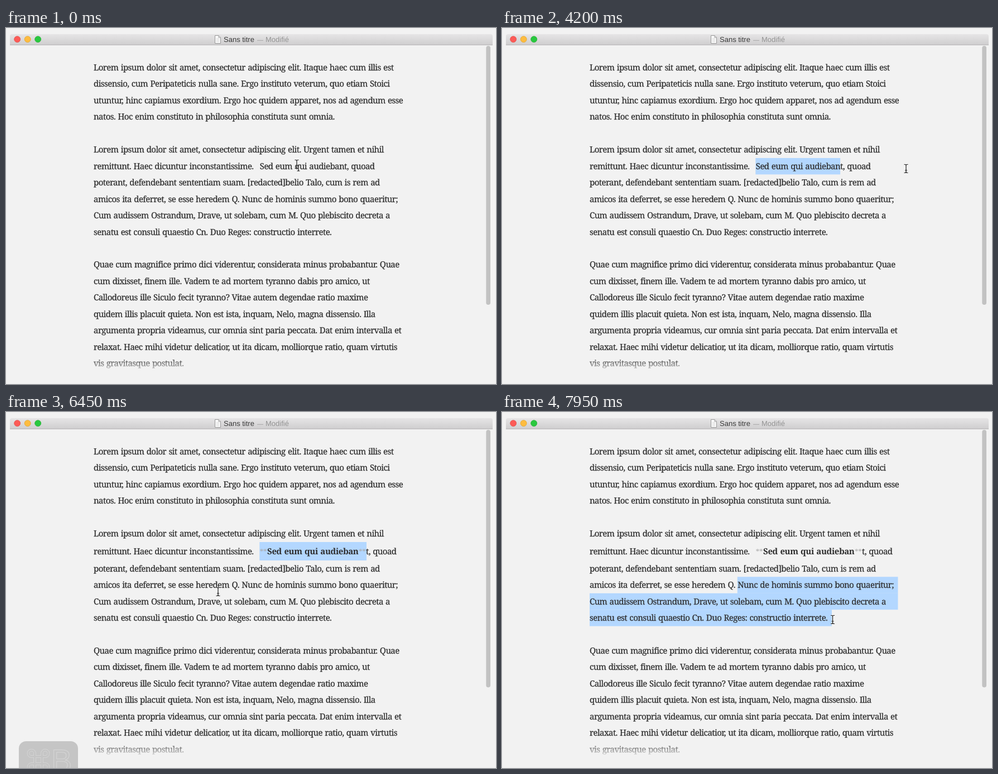
Recreate the animation shown at these times as an HTML page. Size 878 by 638 pixels, loop 8000 ms.

```html
<!DOCTYPE html>
<html lang="la">
<head>
<meta charset="utf-8">
<title>Sans titre</title>
<style>
  html, body { margin: 0; width: 100%; height: 100%; overflow: hidden; background: #f2f2f2; }
  svg { display: block; width: 878px; height: 638px; }
  text { white-space: pre; text-rendering: geometricPrecision; }
  .body {
    font: 15px "Noto Serif", serif; letter-spacing: -.57px; word-spacing: 1px;
    fill: #2e2e2e; stroke: #2e2e2e; stroke-width: .25px;
  }
  .bold { font-weight: 700; letter-spacing: -.4px; stroke: none; }
  .mark { font-size: 13px; fill: #a9a9a9; letter-spacing: -.25px; stroke: none; }
  .title { font: 13px "Liberation Sans", Arial, sans-serif; fill: #3b3b3b; }
  .dim { fill: #949494; }
  .dash { font-size: 11px; }
  .key { font: 56px "Liberation Sans", Arial, sans-serif; }
</style>
</head>
<body>
<svg viewBox="0 0 878 638">
  <defs>
    <linearGradient id="bar" x2="0" y2="1">
      <stop stop-color="#e6e5e6"/><stop offset="1" stop-color="#cfcecf"/>
    </linearGradient>
    <linearGradient id="fade" x2="0" y2="1">
      <stop stop-color="#f2f2f2" stop-opacity="0"/><stop offset="1" stop-color="#f2f2f2"/>
    </linearGradient>
    <path id="loop" d="M51.5 617.5V611.75A5.75 5.75 0 1 0 45.75 617.5H70.25A5.75 5.75 0 1 0 64.5 611.75V636.25A5.75 5.75 0 1 0 70.25 630.5H45.75A5.75 5.75 0 1 0 51.5 636.25Z"/>
    <path id="beam" d="M-3.5-7.5H-2Q0-7.5 0-5.5V5.5Q0 7.5-2 7.5H-3.5M3.5-7.5H2Q0-7.5 0-5.5M0 5.5Q0 7.5 2 7.5H3.5M-2 3H2"/>
  </defs>
  <rect width="878" height="638" fill="#f2f2f2"/>

  <path d="M7 30V15a4 4 0 0 1 4-4H868a4 4 0 0 1 4 4V30Z" fill="url(#bar)"/>
  <path d="M7 30.3H872" stroke="#b2b1b2"/>
  <g stroke-width=".7">
    <circle cx="20.2" cy="20.2" r="5.5" fill="#fc5b57" stroke="#e2443f"/>
    <circle cx="38.7" cy="20.2" r="5.5" fill="#fdbc40" stroke="#dfa023"/>
    <circle cx="57.2" cy="20.2" r="5.5" fill="#29c83f" stroke="#1dad2b"/>
  </g>
  <path d="M374.5 13.5H381L384.5 17V27.5H374.5Z" fill="#fafafa" stroke="#8e8e8e" stroke-width=".9"/>
  <path d="M381 13.5V17H384.5" fill="#ddd" stroke="#8e8e8e" stroke-width=".8"/>
  <path d="M376.5 18.5H382.5M376.5 20.5H382.5M376.5 22.5H382.5M376.5 24.5H382.5" stroke="#d2d2d2" stroke-width=".7"/>
  <text class="title" x="390" y="25">Sans titre</text>
  <text class="title dim dash" x="450" y="25">—</text>
  <text class="title dim" x="465" y="25">Modifié</text>

  <g id="sel" fill="#b3d7ff"></g>
  <g id="page" class="body"></g>
  <rect y="590" width="850" height="29" fill="url(#fade)"/>
  <rect y="619" width="850" height="19" fill="#f2f2f2"/>
  <rect id="thumb" x="860.3" y="32" width="7.7" rx="3.8" fill="#c2c2c2"/>

  <g id="hud">
    <rect x="23" y="590" width="106" height="70" rx="13" fill="#333"/>
    <use id="rim" href="#loop" fill="none" stroke-width="4.6"/>
    <use id="core" href="#loop" fill="none" stroke-width="3.2"/>
    <text id="letter" class="key" x="81" y="643.5" stroke-width="1">B</text>
  </g>

  <g id="cursor" fill="none">
    <use href="#beam" stroke="#fff" stroke-opacity=".6" stroke-width="2.6"/>
    <use href="#beam" stroke="#1c1c1c" stroke-width="1.2"/>
  </g>
</svg>
<script>
const LOOP = 8000, STEP = 150;
const LEFT = 157, RIGHT = 709.5, FIRST = 76, PITCH = 29.45, SHIFT = 3.6;
const SED = 454.8;

const lines = `Lorem ipsum dolor sit amet, consectetur adipiscing elit. Itaque haec cum illis est
dissensio, cum Peripateticis nulla sane. Ergo instituto veterum, quo etiam Stoici
utuntur, hinc capiamus exordium. Ergo hoc quidem apparet, nos ad agendum esse
natos. Hoc enim constituto in philosophia constituta sunt omnia.

Lorem ipsum dolor sit amet, consectetur adipiscing elit. Urgent tamen et nihil
remittunt. Haec dicuntur inconstantissime.
poterant, defendebant sententiam suam. [redacted]belio Talo, cum is rem ad
amicos ita deferret, se esse heredem Q. Nunc de hominis summo bono quaeritur;
Cum audissem Ostrandum, Drave, ut solebam, cum M. Quo plebiscito decreta a
senatu est consuli quaestio Cn. Duo Reges: constructio interrete.

Quae cum magnifice primo dici viderentur, considerata minus probabantur. Quae
cum dixisset, finem ille. Vadem te ad mortem tyranno dabis pro amico, ut
Callodoreus ille Siculo fecit tyranno? Vitae autem degendae ratio maxime
quidem illis placuit quieta. Non est ista, inquam, Nelo, magna dissensio. Illa
argumenta propria videamus, cur omnia sint paria peccata. Dat enim intervalla et
relaxat. Haec mihi videtur delicatior, ut ita dicam, molliorque ratio, quam virtutis
vis gravitasque postulat.`.split("\n");

// Pointer keys: time, x, y
const path = [
  [300, 521, 244], [450, 520, 243], [600, 518.5, 242], [900, 518.5, 242],
  [1200, 514, 241], [1350, 514, 241], [1650, 521, 243], [1950, 452, 249],
  [2100, 438, 249], [2400, 454.5, 249], [2550, 508, 249], [2700, 574, 250],
  [2850, 595, 251], [3150, 604.5, 252], [3450, 604.5, 252], [3750, 732, 284],
  [3900, 786, 288], [4200, 724, 252], [4950, 724, 252], [5250, 655, 291],
  [5550, 490, 355], [5700, 430, 363], [6000, 391, 355], [6300, 380, 333],
  [6450, 380, 322], [6600, 394, 308], [6900, 424, 310], [7200, 424, 310],
  [7500, 505, 337], [7800, 588, 370], [7950, 592.5, 372]
];

const $ = id => document.getElementById(id);
const clamp = (v, lo, hi) => Math.min(hi, Math.max(lo, v));
const mix = (a, b, p) => a + (b - a) * p;
const gray = v => `rgb(${[v, v, v].map(Math.round)})`;
const baseline = row => FIRST + PITCH * row;

function make(tag, attrs, parent, text = "") {
  const el = document.createElementNS("http://www.w3.org/2000/svg", tag);
  for (const k in attrs) el.setAttribute(k, attrs[k]);
  el.textContent = text;
  return parent.appendChild(el);
}

const texts = [];
function addText(row, x, text, cls = "") {
  const el = make("text", { x, class: cls }, $("page"), text);
  texts.push({ el, row });
  return el;
}
lines.forEach((line, row) => line && addText(row, LEFT, line));
const nuncLine = texts.find(t => t.row === 8).el;
const nunc = nuncLine.getStartPositionOfChar(lines[8].indexOf("Nunc")).x;
const phrase = "Sed eum qui audieban";
const plain = addText(6, SED, phrase + "t, quoad");
const styled = [
  addText(6, SED, "**", "mark"), addText(6, 468, phrase, "bold"),
  addText(6, 632, "**", "mark"), addText(6, 645, "t, quoad")
];
const bars = [0, 1, 2].map(() => make("rect", {}, $("sel")));

function pointer(t) {
  const i = path.findIndex(k => k[0] >= t);
  if (i <= 0) return path[i ? path.length - 1 : 0].slice(1);
  const [a, b] = [path[i - 1], path[i]], p = (t - a[0]) / (b[0] - a[0]);
  return [mix(a[1], b[1], p), mix(a[2], b[2], p)];
}

// Nearest letter edge inside the dragged phrase
function snap(x) {
  let best = SED;
  for (let i = 0; i < phrase.length; i++) {
    const edge = plain.getEndPositionOfChar(i).x;
    if (Math.abs(edge - x) < Math.abs(best - x)) best = edge;
  }
  return best;
}

function selection(t, x, y) {
  if (t < 2550) return [];
  if (t < 4500) return [[SED - .5, 233, snap(x), PITCH]];
  if (t < 7200) return [[SED - .5, 233, 646, PITCH + SHIFT]];
  if (t < 7350) return [];
  const top = baseline(8) + SHIFT - 19.8;
  const row = clamp(Math.floor((y - top) / PITCH), 0, 2);
  return Array.from({ length: row + 1 }, (_, i) =>
    [i ? LEFT : nunc - .5, top + i * PITCH, i < row ? RIGHT : x - 1.5, PITCH]);
}

function draw(time) {
  const t = Math.floor(time / STEP) * STEP;
  const bold = t >= 4500;
  const [x, y] = pointer(t);
  $("cursor").setAttribute("transform", `translate(${x} ${y})`);

  const boxes = selection(t, x, y);
  bars.forEach((bar, i) => {
    const [l, top, r, h] = boxes[i] || [0, 0, 0, 0];
    Object.entries({ x: l, y: top, width: Math.max(0, r - l), height: h })
      .forEach(([k, v]) => bar.setAttribute(k, v));
  });

  for (const { el, row } of texts) {
    const drop = !bold || row < 6 ? 0 : row === 6 ? 1.9 : SHIFT;
    el.setAttribute("y", baseline(row) + drop);
  }
  plain.setAttribute("visibility", bold ? "hidden" : "visible");
  styled.forEach(el => el.setAttribute("visibility", bold ? "visible" : "hidden"));
  $("thumb").setAttribute("height", bold ? 461.5 : 464);

  const p = clamp((t - 6000) / 650, 0, 1);
  $("hud").setAttribute("opacity", bold ? 1 - p * p * (3 - 2 * p) : 0);
  const q = clamp(p * 1.5, 0, 1), fill = gray(mix(255, 51, q)), edge = gray(mix(255, 125, q));
  $("rim").setAttribute("stroke", edge);
  $("core").setAttribute("stroke", fill);
  $("letter").setAttribute("fill", fill);
  $("letter").setAttribute("stroke", edge);
  $("letter").setAttribute("stroke-opacity", q);
}

const start = performance.now();
function tick() {
  draw((performance.now() - start) % LOOP);
  requestAnimationFrame(tick);
}
tick();
</script>
</body>
</html>
```
